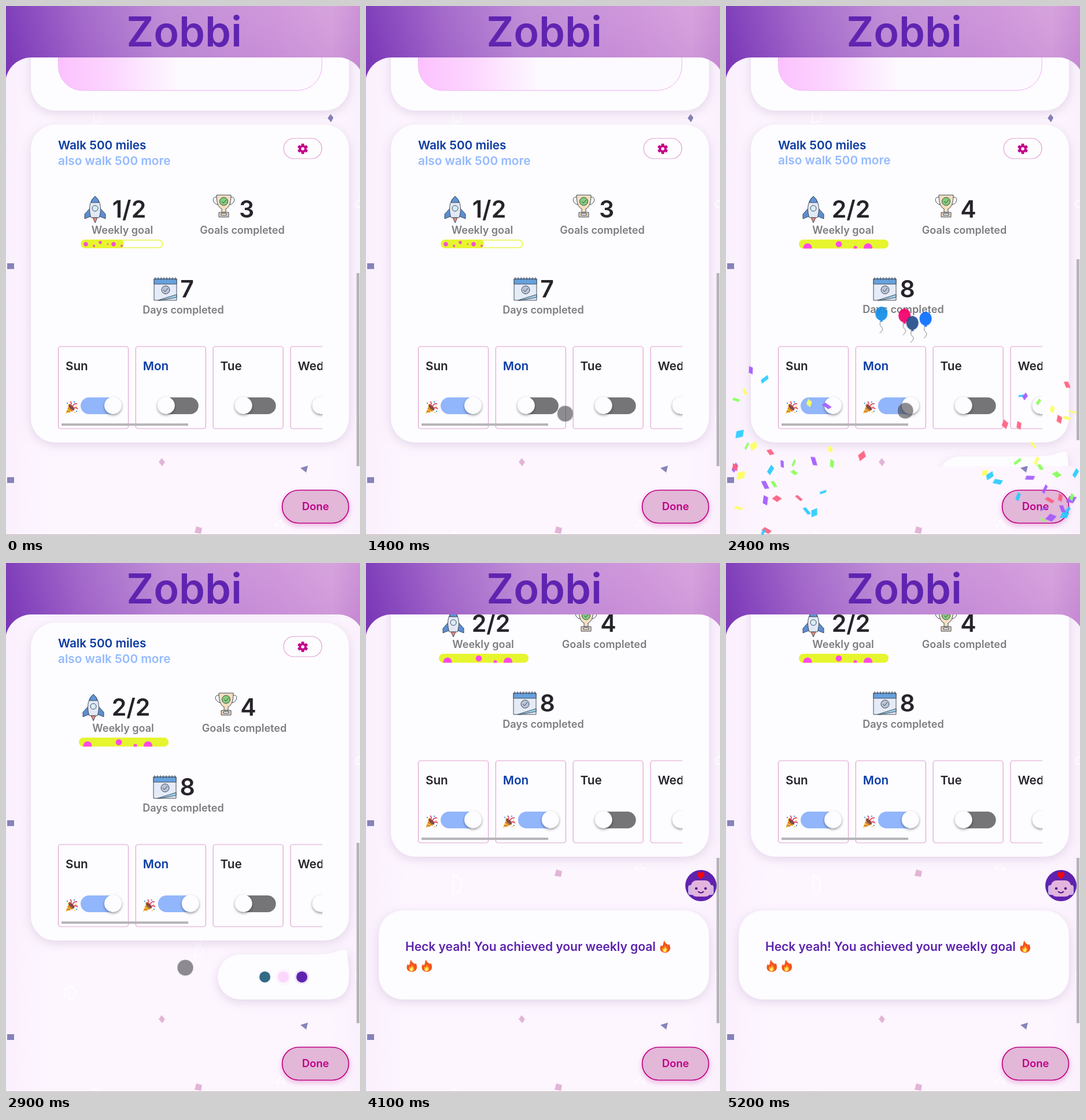
Recreate the animation shown at these times as an HTML page. Size 612 by 915 pixels, loop 5300 ms.

```html
<!DOCTYPE html>
<html lang="en">
<head>
<meta charset="utf-8">
<title>Weekly goal</title>
<style>
html, body { margin: 0; width: 100%; height: 100%; overflow: hidden; background: #fcf5fe; }
svg { display: block; }
text { font: 600 20.7px Inter, sans-serif; fill: #26232a; }
.logo { font-size: 72px; fill: #5f24b0; }
.num { font-size: 41px; }
.label { font-size: 18px; fill: #7d7d7f; }
.mid { text-anchor: middle; }
.card { fill: #fdfcff; filter: drop-shadow(0 5px 9px rgba(90, 40, 110, .15)); }
.knob { fill: #fdfcff; filter: drop-shadow(0 2px 2px rgba(0, 0, 0, .4)); }
.line { fill: none; stroke: #dfa3d0; stroke-width: 1.2; }
.ink { stroke: #3d4a5c; stroke-width: 1; stroke-linejoin: round; }
.faint { fill: none; stroke: #fff; stroke-width: 2; stroke-linecap: round; }
.bar { fill: #b7b4ba; }

.before, .after, .goal3, .goal4, .typing, .message, .overlay, .arrows, .touch, .press {
  animation: 5.3s step-end infinite;
}
.before { animation-name: hide1900; }
.after { animation-name: show1900; }
.goal3 { animation-name: hide2300; }
.goal4 { animation-name: show2300; }
.typing { animation-name: typing; }
.message { animation-name: message; }
.overlay { animation-name: overlay; }
@keyframes hide1900 { 0% { opacity: 1 } 35.84%, to { opacity: 0 } }
@keyframes show1900 { 0% { opacity: 0 } 35.84%, to { opacity: 1 } }
@keyframes hide2300 { 0% { opacity: 1 } 43.39%, to { opacity: 0 } }
@keyframes show2300 { 0% { opacity: 0 } 43.39%, to { opacity: 1 } }
@keyframes typing { 0% { opacity: 0 } 45.28% { opacity: 1 } 66.04%, to { opacity: 0 } }
@keyframes message { 0% { opacity: 0 } 66.04%, to { opacity: 1 } }
@keyframes overlay { 0% { opacity: 0 } 81.13% { opacity: 1 } 90.57%, to { opacity: 0 } }

.scroll { animation: scroll 5.3s ease-in-out infinite; }
@keyframes scroll {
  0%, 45.28% { transform: none }
  52.83%, 66.04% { transform: translateY(-102px) }
  73.58%, to { transform: translateY(-247px) }
}
.thumb { animation: thumb 5.3s ease-in-out infinite; }
@keyframes thumb {
  0%, 45.27% { y: 462px; height: 334px }
  45.28% { y: 438px; height: 313px }
  52.83%, 66.03% { y: 484px; height: 312px }
  66.04% { y: 451px; height: 286px }
  73.58%, to { y: 510px; height: 286px }
}
.slide { animation: slide 5.3s linear infinite; }
@keyframes slide { 0%, 34.9% { transform: none } 40.5%, to { transform: translateX(42px) } }
.track { animation: track 5.3s linear infinite; }
@keyframes track { 0%, 34.9% { fill: #757577 } 37.74% { fill: #6f7789 } 40.5%, to { fill: #92b6fb } }

.arrows { animation-name: arrows; animation-timing-function: linear; }
@keyframes arrows {
  0%, 13.2% { opacity: 0; transform: translate(606px, 792px) }
  13.21% { opacity: 1; transform: translate(606px, 792px) }
  15.09%, 16.9% { opacity: 1; transform: translate(582px, 761px) }
  18.86% { opacity: 1; transform: translate(556px, 752px) }
  18.87%, to { opacity: 0; transform: translate(556px, 752px) }
}
.touch { animation-name: touch; animation-timing-function: ease-in-out; }
@keyframes touch {
  0%, 18.86% { opacity: 0; transform: translate(556px, 752px) }
  18.87% { opacity: 1; transform: translate(556px, 752px) }
  29%, 39.62% { opacity: 1; transform: translate(312px, 698px) }
  45%, 57% { opacity: 1; transform: translate(310px, 700px) }
  66% { opacity: 1; transform: translate(340px, 935px) }
  66.04%, to { opacity: 0; transform: translate(340px, 935px) }
}
.press { animation-name: press; }
@keyframes press { 0% { opacity: 0 } 33.96% { opacity: 1 } 39.62%, to { opacity: 0 } }

.dot { transform-box: fill-box; transform-origin: center; animation: dot 1.2s ease-in-out infinite; }
@keyframes dot { 0%, 60%, to { transform: scale(.75); opacity: 0 } 30% { transform: none; opacity: .22 } }

.turn { transform-box: fill-box; transform-origin: center; animation: turn 2.65s ease-in-out infinite alternate; }
@keyframes turn { from { transform: scaleX(.8) rotate(-6deg) } to { transform: rotate(8deg) } }

.piece { opacity: 0; animation: burst 5.3s infinite; }
@keyframes burst {
  0%, 34.5% { opacity: 0; transform: none }
  34.51% { opacity: 1; transform: none; animation-timing-function: cubic-bezier(.35, .42, .6, 1) }
  41.5% { opacity: 1; transform: translate(var(--x), var(--y)); animation-timing-function: cubic-bezier(.5, 0, .8, .7) }
  48% { opacity: .7 }
  52%, to { opacity: 0; transform: translate(calc(var(--x) * 1.3), calc(var(--y) + 230px)) }
}
.flip { animation: flip .53s linear infinite; }
@keyframes flip {
  from { transform: rotate(0) skewX(-20deg) }
  50% { transform: rotate(180deg) skewX(-20deg) scaleY(.4) }
  to { transform: rotate(360deg) skewX(-20deg) }
}
.balloon { opacity: 0; animation: rise 5.3s infinite; }
@keyframes rise {
  0%, 35% { opacity: 0; transform: translate(298px, 694px) }
  35.1% { opacity: 1; transform: translate(298px, 694px); animation-timing-function: ease-out }
  37.74% { opacity: 1; transform: translate(var(--x), var(--y)); animation-timing-function: ease-in }
  48% { opacity: .9 }
  52.5%, to { opacity: 0; transform: translate(var(--far), 240px) }
}
.tip text { font: 18.2px "Liberation Sans", Arial, sans-serif; fill: #6a6c70; }
.tip .tag { font-weight: 700; fill: #881280; }
.tip .id { fill: #1a1aa6; }
</style>
</head>
<body>
<svg width="612" height="915" viewBox="0 0 612 915">
  <defs>
    <linearGradient id="head">
      <stop offset="0" stop-color="#7833b6"/><stop offset=".22" stop-color="#a062c8"/>
      <stop offset=".45" stop-color="#bc88d5"/><stop offset=".75" stop-color="#cd91d9"/>
      <stop offset=".92" stop-color="#d49ddb"/><stop offset="1" stop-color="#c98cd4"/>
    </linearGradient>
    <linearGradient id="shade" x2="0" y2="1">
      <stop offset="0" stop-color="#fff" stop-opacity=".06"/><stop offset="1" stop-color="#5a18a5" stop-opacity=".08"/>
    </linearGradient>
    <linearGradient id="pink">
      <stop offset="0" stop-color="#fcc1ff"/><stop offset=".2" stop-color="#fcd5ff"/><stop offset=".46" stop-color="#fdfaff"/>
    </linearGradient>
    <linearGradient id="page">
      <stop offset="0" stop-color="#faf0fd"/><stop offset=".12" stop-color="#fdf6ff"/>
      <stop offset=".9" stop-color="#fdf6ff"/><stop offset="1" stop-color="#faf0fd"/>
    </linearGradient>
    <clipPath id="view"><path d="M-1 134a45 45 0 0 1 45-45H574a45 45 0 0 1 45 45V796H-1z"/></clipPath>
    <clipPath id="days"><rect x="88" y="580" width="459" height="160"/></clipPath>
    <clipPath id="fill1"><rect x="130" y="404" width="74" height="15" rx="7.5"/></clipPath>
    <clipPath id="fill2"><rect x="126" y="404" width="155" height="15.500" rx="7.750"/></clipPath>

    <g id="tile">
      <path d="M561 187l5 6-4 8-6-7z" fill="#8583b8"/>
      <path d="M269 42l6 7-5 7-6-7z" fill="#e2b5d7"/>
      <path d="M509 59l13-4-3 12z" fill="#8583b8"/>
      <path d="M2 75h12v10H2z" fill="#8583b8"/>
      <path d="M329 160l10 3-2 10-11-2z" fill="#e2b5d7"/>
    </g>
    <g id="rocket" class="ink">
      <path d="M15 38l4 9 4-9z" fill="#ee8a77"/>
      <path d="M11 21L1 32v8l10-4zM27 21l10 11v8l-10-4z" fill="#5c8ed0"/>
      <path d="M19 1C8 10 8 26 12 38h14C30 26 30 10 19 1z" fill="#e3e9f4"/>
      <path d="M19 1q-6 5-7 11h14Q25 6 19 1z" fill="#5f94d6"/>
      <circle cx="19" cy="22" r="5" fill="#d8edf9"/>
    </g>
    <g id="trophy" class="ink">
      <path d="M8 5C-2 2-1 17 11 18M31 5C41 2 40 17 28 18" fill="none"/>
      <path d="M7 1h25c0 14-3 21-9 24v6h-7v-6C10 22 7 15 7 1z" fill="#f3dfbd"/>
      <path d="M11 31h17v8H11z" fill="#e9cfb5"/><path d="M15 33h9v3h-9z" fill="#fff"/>
      <circle cx="19.500" cy="12" r="7" fill="#83cd79"/><path d="M16 12l3 3 5-6" fill="none"/>
    </g>
    <g id="calendar" class="ink">
      <path d="M1 3h39v37H1z" fill="#e5ebf7"/><path d="M1 3h39v9H1z" fill="#67a1dc"/>
      <path d="M3 0v5m5-5v5m5-5v5m5-5v5m5-5v5m5-5v5m5-5v5m5-5v5"/>
      <circle cx="21" cy="22" r="7" fill="#b9c3d6"/><path d="M17 22l3 3 5-6" fill="none"/>
      <path d="M8 40l32-10v5L12 40z" fill="#9fd2ec"/>
    </g>
    <g id="popper">
      <path d="M1 22L7 7l9 9z" fill="#f5b834"/><path d="M3 18l6 1M5 12l8 6" stroke="#d17726" stroke-width="2"/>
      <ellipse cx="11" cy="11" rx="3" ry="7" transform="rotate(-45 11 11)" fill="#7c4a45"/>
      <path d="M9 8Q13 5 9 1M13 10q2-6 8-5M15 13q4-3 7 1" fill="none" stroke="#df4662" stroke-width="1.800"/>
      <path d="M3 3h2v2H3zM15 1h2v2h-2zM19 17h2v2h-2z" fill="#4095dd"/>
      <path d="M18 8h2v2h-2zM5 6h2v2H5zM16 19h2v2h-2z" fill="#f0c53b"/>
    </g>
    <g id="flame">
      <path d="M8 0c1 6 5 5 6 8l2-2c5 9 0 15-7 15S-2 15 2 8l2 2C7 7 5 4 8 0z" fill="#f4521d"/>
      <path d="M8 6c0 4 4 5 5 8 1 4-1 6-4 6-5 0-6-4-4-8l2 1c2-2 1-4 1-7z" fill="#fc9f22"/>
      <path d="M9 12c3 4 3 7 0 8-4 0-4-3-2-5 1 0 2-1 2-3z" fill="#fff06a"/>
    </g>
  </defs>

  <rect width="612" height="140" fill="url(#head)"/>
  <rect width="612" height="140" fill="url(#shade)"/>
  <text class="logo mid" x="308" y="70">Zobbi</text>

  <path d="M-1 134a45 45 0 0 1 45-45H574a45 45 0 0 1 45 45V915H-1z" fill="url(#page)"/>
  <path d="M561 187l5 6-4 8-6-7z" fill="#8583b8"/>
  <use href="#tile" y="370"/><use href="#tile" y="740"/>
  <g id="squiggles"></g>
  <rect y="914" width="612" height="1" fill="#c6b3b8"/>

  <g clip-path="url(#view)">
    <g class="scroll">
      <rect class="card" x="43" y="-100" width="550" height="281" rx="42"/>
      <rect x="90.500" y="-60" width="455.500" height="206" rx="42" fill="url(#pink)" stroke="#efb0f2"/>

      <rect class="card" x="43" y="205" width="550" height="550" rx="42"/>
      <text x="90" y="248" style="fill:#0a3a9f">Walk 500 miles</text>
      <text x="90" y="274.500" style="fill:#94baff">also walk 500 more</text>
      <rect class="line" x="480" y="229" width="66" height="35" rx="17.500"/>
      <g id="gear" transform="translate(513 247)" fill="#c3008a"></g>

      <g class="before">
        <use href="#rocket" x="135" y="328"/>
        <text class="num mid" x="213" y="366">1/2</text>
        <text class="label mid" x="201" y="393.500">Weekly goal</text>
        <rect x="130" y="405" width="141" height="13" rx="6.500" fill="none" stroke="#e8f64a" stroke-width="1.600"/>
        <g clip-path="url(#fill1)" fill="#f052cf">
          <path d="M129 403h80v18h-80z" fill="#e6f52e"/>
          <circle cx="138" cy="412" r="3.700"/><circle cx="152" cy="415" r="2"/><circle cx="163" cy="409" r="2.700"/>
          <circle cx="176" cy="412" r="1.300"/><circle cx="186" cy="412" r="3.700"/><circle cx="200" cy="415" r="2"/>
        </g>
        <use href="#calendar" x="255" y="469"/>
        <text class="num mid" x="313" y="504">7</text>
        <use href="#trophy" x="357" y="326"/>
        <text class="label mid" x="408.500" y="393.500">Goals completed</text>
        <text class="num mid" x="416" y="366">3</text>
      </g>
      <g class="after">
        <use href="#rocket" x="132" y="328"/>
        <text class="num mid" x="216" y="366">2/2</text>
        <text class="label mid" x="202.500" y="393.500">Weekly goal</text>
        <g clip-path="url(#fill2)" fill="#ff48e6">
          <path d="M125 403h158v18H125z" fill="#e6f52e"/>
          <circle cx="141" cy="418" r="7.500"/><circle cx="195" cy="412" r="5.300"/>
          <circle cx="223.500" cy="418" r="3"/><circle cx="245.500" cy="418" r="7.500"/>
        </g>
        <use href="#calendar" x="254" y="469"/>
        <text class="num mid" x="313.500" y="504">8</text>
        <use href="#trophy" x="361" y="326"/>
        <text class="label mid" x="412" y="393.500">Goals completed</text>
        <text class="num mid goal3" x="419" y="366">3</text>
        <text class="num mid goal4" x="419" y="366">4</text>
      </g>
      <text class="label mid" x="306.500" y="531.500">Days completed</text>

      <g id="week" clip-path="url(#days)"></g>
      <rect class="bar" x="96" y="722" width="219" height="4"/>

      <g class="typing">
        <path class="card" d="M405 779H535Q560 779 574 773Q589 768 590 774Q591 790 593 806V818Q593 857 554 857H405A39 39 0 0 1 405 779z"/>
        <g id="dots"></g>
      </g>

      <g class="message">
        <g transform="translate(579 805)">
          <circle r="27" fill="#6022ae"/>
          <path d="M0-11c-4-4-7-6-6-10 2-4 5-3 6 0 1-3 5-4 6 0 1 4-2 6-6 10z" fill="#f5050d"/>
          <rect x="-22" y="-1" width="44" height="17" rx="4" fill="#cdb4e6"/>
          <rect x="-17" y="-9" width="34" height="28" rx="9" fill="#e3b5dd"/>
          <circle cx="-8" cy="5" r="2.300" fill="#4c1b8c"/><circle cx="8" cy="5" r="2.300" fill="#4c1b8c"/>
          <path d="M-5 10q5 5 10 0" fill="none" stroke="#4c1b8c" stroke-width="2"/>
        </g>
        <rect class="card" x="22" y="848" width="571" height="154" rx="42"/>
        <text x="68" y="918" style="font-size:21px;fill:#5c23ad">Heck yeah! You achieved your weekly goal</text>
        <use href="#flame" x="508" y="900"/><use href="#flame" x="70" y="933"/><use href="#flame" x="96" y="933"/>
      </g>
    </g>
  </g>
  <rect class="bar thumb" x="606" y="462" width="5" height="334"/>

  <rect x="477.500" y="837.500" width="115" height="57" rx="28.500" fill="#e2b7d8" stroke="#c00084" stroke-width="1.700" style="filter:drop-shadow(0 4px 5px rgba(190,0,130,.25))"/>
  <text class="mid" x="535" y="872" style="font-size:18.400px;fill:#c00086">Done</text>

  <g id="party"></g>

  <g class="arrows">
    <path d="M0-11l5 5H1.500v4.500H6V-5l5 5-5 5V1.500H1.500V6H5l-5 5-5-5h3.500V1.500H-6V5l-5-5 5-5v3.500h4.500V-6H-5z" stroke="#fff" stroke-width=".8"/>
  </g>
  <g class="touch">
    <circle r="14" fill="#434247" fill-opacity=".6" stroke="#fff" stroke-opacity=".5"/>
    <circle class="press" r="14" fill="none" stroke="#c9c9d0" stroke-opacity=".8" stroke-width="4"/>
  </g>

  <g class="overlay tip">
    <rect width="612" height="915" fill="#6a9fdc" fill-opacity=".69"/>
    <rect x="1" y="879" width="195.500" height="40" rx="3" fill="#fff" style="filter:drop-shadow(0 0 3px rgba(0,0,0,.4))"/>
    <text class="tag" x="14" y="906">div<tspan class="id">#root</tspan></text>
    <text x="102" y="906">425 × 634</text>
  </g>
</svg>
<script>
const fill = (id, html) => document.getElementById(id).innerHTML = html;
const times = (n, fn) => Array.from({ length: n }, (_, i) => fn(i)).join('');

let seed = 11;
const rnd = (lo, hi) => {
  seed = (seed * 16807) % 2147483647;
  return lo + (hi - lo) * seed / 2147483647;
};

fill('gear', times(6, i => `<rect x="-2.500" y="-9" width="5" height="6" rx="1" transform="rotate(${i * 60})"/>`) +
  '<circle r="6.500"/><circle r="2.800" fill="#fdfcff"/>');

// Faint white doodles of the page pattern
const doodles = [
  'M150 171V203Q165 203 165 187Q165 171 150 171',
  'M612 335Q603 338 604 345Q606 350 612 348',
  'M326 287q8 6 2 12q-6 6 0 12M338 284q-6 8 1 13q6 6 0 12',
  'M100 378q-6-10 6-14q16-2 17 10q-3 12-14 9q-6-8 2-11',
  'M474 151h.1M468 158h.1M480 158h.1'
];
fill('squiggles', [0, 370, 740].map(y => `<g transform="translate(0 ${y})">` + doodles.map((d, i) =>
  `<path class="faint turn" d="${d}" style="animation-delay:${-i * .7}s${i == 4 ? ';stroke-width:5' : ''}"/>`).join('') + '</g>').join(''));

const knob = (x, cls = '') => `<circle class="knob ${cls}" cx="${x}" cy="691" r="15"/>`;
fill('week', ['Sun', 'Mon', 'Tue', 'Wed'].map((day, i) => {
  const x = 90 + i * 133.8, mon = i == 1, on = i == 0;
  return `<rect class="line" x="${x + .5}" y="589" width="121" height="142" rx="4"/>
    <text x="${x + 13}" y="630"${mon ? ' style="fill:#0b3ca5"' : ''}>${day}</text>
    ${i < 2 ? `<use href="#popper" x="${x + 12}" y="683" class="${mon ? 'after' : ''}"/>` : ''}
    <rect class="${mon ? 'track' : ''}" x="${x + 39}" y="677" width="70" height="29" rx="14.500" fill="${on ? '#92b6fb' : '#757577'}"/>
    ${knob(x + (on ? 95 : 53), mon ? 'slide' : '')}`;
}).join(''));

fill('dots', ['#316a87', '#fbd8fb', '#6022ae'].map((c, i) => {
  const at = `cx="${447.5 + i * 32}" cy="818" fill="${c}"`;
  return `<circle class="dot" ${at} r="13.500" style="animation-delay:${i * .2 - .1}s"/><circle ${at} r="9.500"/>`;
}).join(''));

const colors = ['#26ccff', '#a25afd', '#ff5e7e', '#88ff5a', '#fcff5a'];
const confetti = side => times(32, i => {
  const a = rnd(.4, 1.5), r = rnd(70, 310), size = rnd(9, 15);
  const x = Math.cos(a) * r * (side ? -.65 : .9), y = -Math.sin(a) * r;
  return `<g transform="translate(${side * 612} 915)"><g class="piece" style="--x:${x.toFixed()}px;--y:${y.toFixed()}px;animation-delay:${rnd(0, .04).toFixed(3)}s">
    <rect class="flip" x="${-size / 2}" y="-5" width="${size}" height="${rnd(6, 13)}" fill="${colors[i % 5]}" style="animation-delay:${-rnd(0, .53).toFixed(3)}s"/></g></g>`;
});
const balloon = (c, x, y, far) => `<g class="balloon" style="--x:${x}px;--y:${y}px;--far:${far}px">
  <path d="M0 11q-5 8 0 12t-3 11" fill="none" stroke="#555" stroke-width=".8"/>
  <ellipse rx="10.500" ry="12" fill="${c}"/><path d="M0 10l3 4h-6z" fill="${c}"/></g>`;
fill('party', confetti(0) + confetti(1) +
  balloon('#168fe6', 290, 675, 225) + balloon('#f4006c', 308, 680, 310) +
  balloon('#0b70ff', 323, 688, 390) + balloon('#28508e', 311, 699, 345));
</script>
</body>
</html>
```
